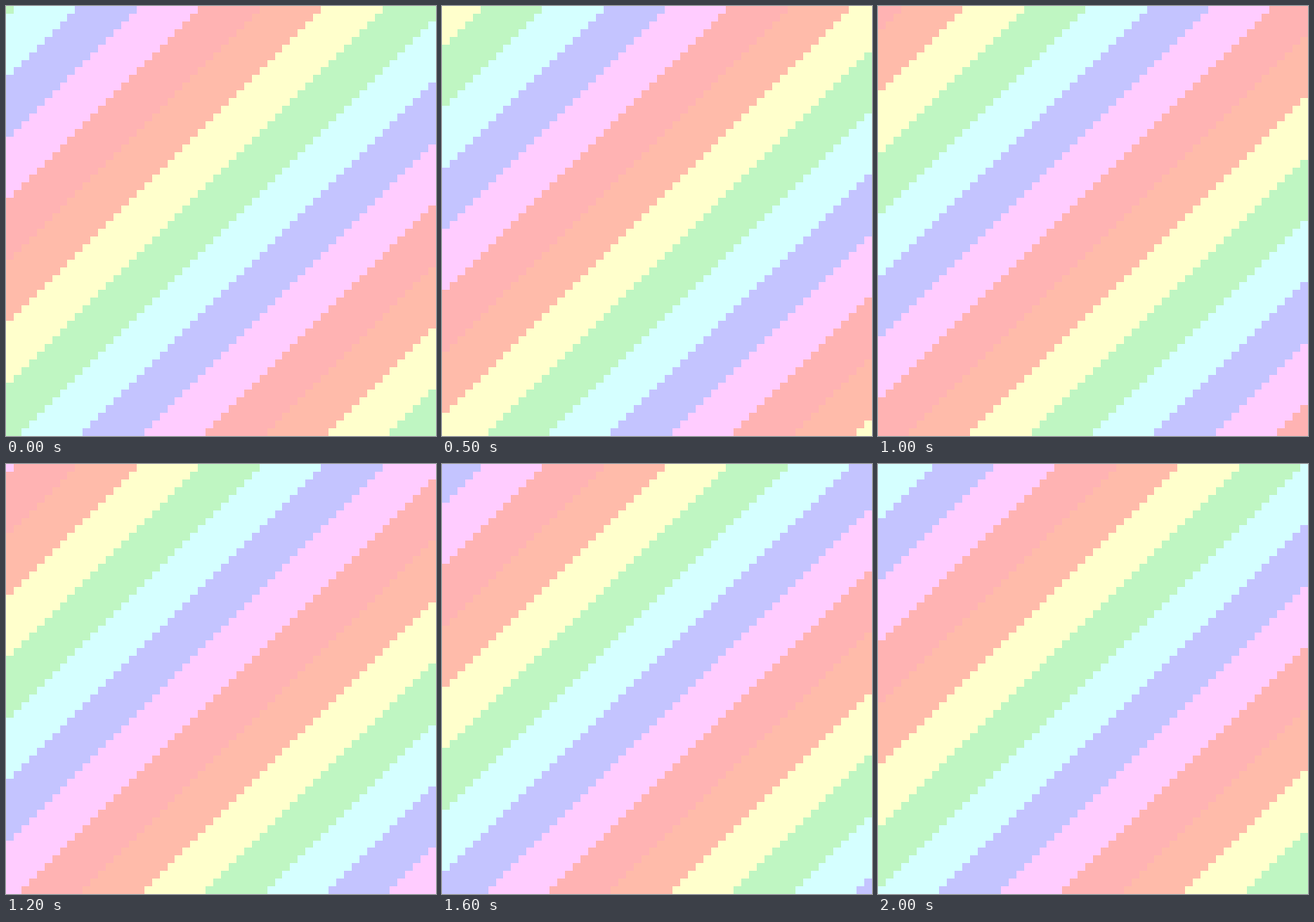
An HTML page with a canvas that plays this animation: 500 px wide and 500 px high, repeating every 2.1 s.

```html
<!DOCTYPE html>
<html lang="en">
<head>
<meta charset="utf-8">
<title>Pastel stripes</title>
<style>
  html, body { margin: 0; width: 100%; height: 100%; overflow: hidden; }
  canvas { display: block; width: 500px; height: 500px; }
</style>
</head>
<body>
<canvas id="stage" width="500" height="500"></canvas>
<script>
const SIZE = 500, CELLS = 56, BAND = 8;
const LOOP = 2100, TICK = 100;
const colors = ['#d5ffff', '#c4c4ff', '#ffccff', '#ffb3b3', '#ffbbaa', '#ffffcc', '#bff6c2'];
const ctx = document.getElementById('stage').getContext('2d');
const edge = i => Math.round(i * SIZE / CELLS);

// Stripes move two cells at a time, sampled on a coarse clock.
function shiftAt(ms) {
  const tick = Math.floor((ms % LOOP) / TICK);
  return 2 * Math.floor(tick * 29 / 21);
}

function draw(shift) {
  for (let row = 0; row < CELLS; row++) {
    for (let col = 0; col < CELLS; col++) {
      const pos = (col + row - shift - 1 + 2 * CELLS) % CELLS;
      ctx.fillStyle = colors[Math.floor(pos / BAND)];
      const x = edge(col), y = edge(row);
      ctx.fillRect(x, y, edge(col + 1) - x, edge(row + 1) - y);
    }
  }
}

const start = performance.now();
let shown = 0;
draw(shown);

function loop() {
  const shift = shiftAt(performance.now() - start);
  if (shift !== shown) draw(shown = shift);
  requestAnimationFrame(loop);
}
requestAnimationFrame(loop);
</script>
</body>
</html>
```
